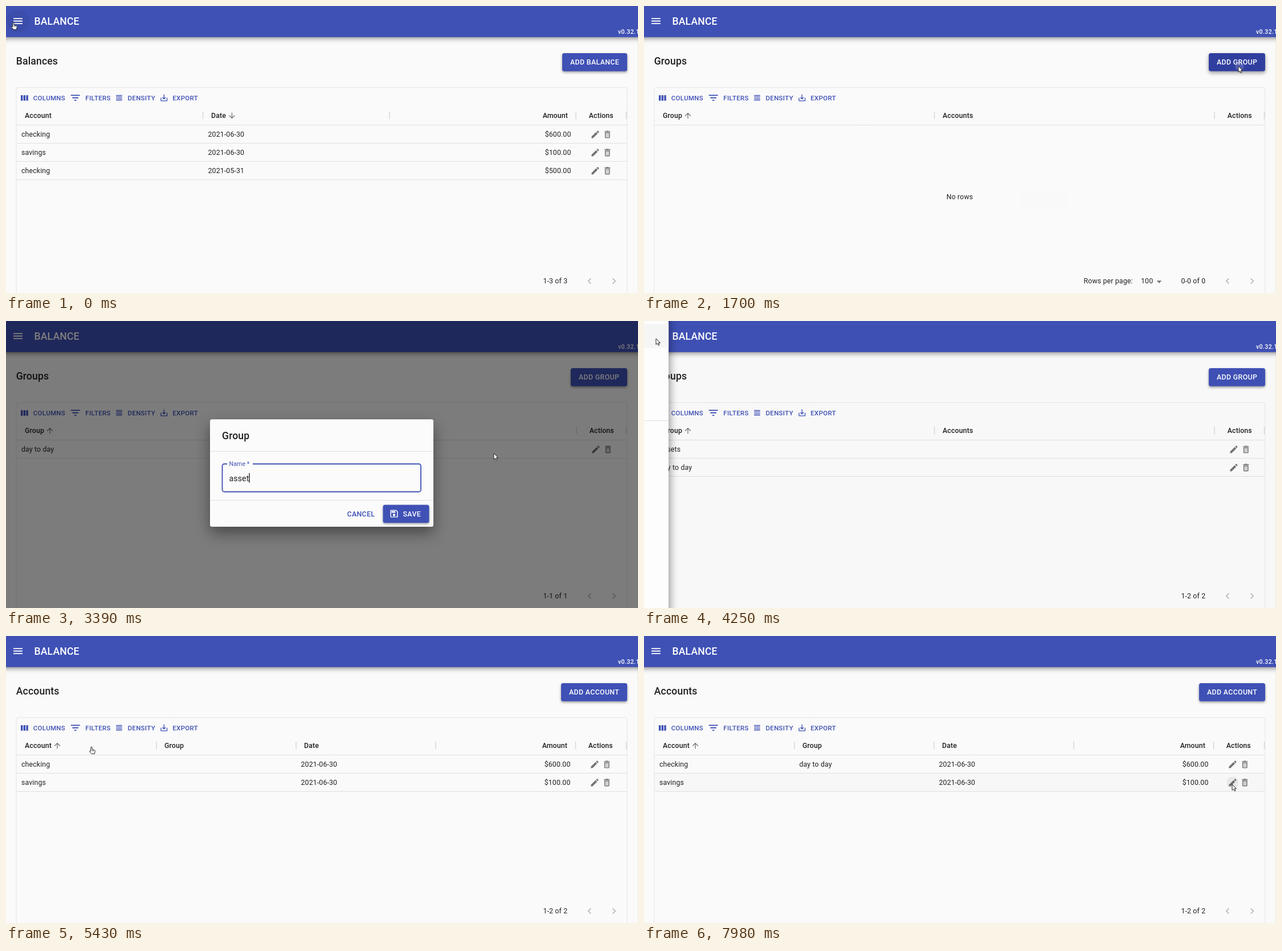
An HTML page with a canvas for the animation above (8000 ms loop, 1109 by 505 pixels).

```html
<!DOCTYPE html>
<html lang="en">
<head>
<meta charset="utf-8">
<title>Balance</title>
<style>
html, body { margin: 0; width: 100%; height: 100%; overflow: hidden; background: #fafafa; }
canvas { display: block; width: 1109px; height: 505px; }
</style>
</head>
<body>
<canvas id="stage"></canvas>
<script>
const W = 1109, H = 505, LOOP = 8000, STEP = 169.75;
const canvas = document.getElementById('stage');
const ctx = canvas.getContext('2d');
const dpr = window.devicePixelRatio || 1;
canvas.width = Math.round(W * dpr);
canvas.height = Math.round(H * dpr);

const BLUE = '#3f51b5', INK = 'rgba(0,0,0,.87)', SOFT = 'rgba(0,0,0,.54)';
const LINE = '#e0e0e0', BODY = 12.35, INPUT = 14.1, TITLE = 17.64;

// Icons on a 24 unit grid
const dot = (x, y, r) => `M${x - r} ${y}a${r} ${r} 0 1 0 ${2 * r} 0a${r} ${r} 0 1 0 ${-2 * r} 0z`;
const ICONS = {
  menu: 'M3 18h18v-2H3zm0-5h18v-2H3zm0-7v2h18V6z',
  filter: 'M10 18h4v-2h-4zM3 6v2h18V6zm3 7h12v-2H6z',
  density: 'M4 15h16v-2H4zm0 4h16v-2H4zm0-8h16V9H4zm0-6v2h16V5z',
  save: 'M17 3H5a2 2 0 0 0-2 2v14a2 2 0 0 0 2 2h14a2 2 0 0 0 2-2V7zm2 16H5V5h11.2L19 7.8zM6 6h9v4H6z' + dot(12, 15, 3),
  download: 'M19 12v7H5v-7H3v7a2 2 0 0 0 2 2h14a2 2 0 0 0 2-2v-7zm-6 .7l2.6-2.6L17 11.5l-5 5-5-5 1.4-1.4 2.6 2.6V3h2z',
  edit: 'M3 17.25V21h3.75L17.8 9.94 14.06 6.2zM20.7 7a1 1 0 0 0 0-1.4l-2.3-2.3a1 1 0 0 0-1.4 0l-1.9 1.8 3.75 3.75z',
  trash: 'M15.5 4l-1-1h-5l-1 1H5v2h14V4zM6 19a2 2 0 0 0 2 2h8a2 2 0 0 0 2-2V7H6zM8 9h8v10H8z',
  down: 'M20 12l-1.4-1.4-5.6 5.6V4h-2v12.2l-5.6-5.6L4 12l8 8z',
  up: 'M4 12l1.4 1.4L11 7.8V20h2V7.8l5.6 5.6L20 12l-8-8z',
  prev: 'M15.4 7.4L14 6l-6 6 6 6 1.4-1.4-4.6-4.6z',
  next: 'M10 6L8.6 7.4l4.6 4.6-4.6 4.6L10 18l6-6z',
  drop: 'M7 10l5 5 5-5z',
  wallet: 'M21 7.3V5a2 2 0 0 0-2-2H5a2 2 0 0 0-2 2v14a2 2 0 0 0 2 2h14a2 2 0 0 0 2-2v-2.3a2 2 0 0 0 1-1.7V9a2 2 0 0 0-1-1.7zM20 9v6h-7V9zM5 19V5h14v2h-6a2 2 0 0 0-2 2v6a2 2 0 0 0 2 2h6v2z' + dot(16, 12, 1.5),
  bank: 'M6.5 10h-2v7h2zm6 0h-2v7h2zm8.5 9H2v2h19zm-2.5-9h-2v7h2zm-7-6.7L16.7 6H6.3zm0-2.3L2 6v2h19V6z',
  group: dot(12, 12, 10) + dot(12, 12, 8) + dot(8, 14, 2) + dot(12, 8, 2) + dot(16, 14, 2),
  chart: 'M19 3H5a2 2 0 0 0-2 2v14a2 2 0 0 0 2 2h14a2 2 0 0 0 2-2V5a2 2 0 0 0-2-2zm0 16H5V5h14zM7 10h2v7H7zm4-3h2v10h-2zm4 6h2v4h-2z',
  door: 'M14 6v15H3v-2h2V3h9v1h5v15h2v2h-4V6zM7 5v14h5V5zm3 6v2h1v-2z'
};
for (const k in ICONS) ICONS[k] = new Path2D(ICONS[k]);
const ARROW = new Path2D('M0 0v10.4l2.5-2.2 1.7 3.7 1.8-.8-1.7-3.6h3.2z');
const HAND = new Path2D('M-1.1 1.1a1.1 1.1 0 0 1 2.2 0V4.8l4 1q1.5 .5 1.2 2l-.9 4.5H.3L-3.4 8.200q.2-1.500 1.500-1L-1.100 7.800z');

const PAGES = {
  balances: {
    title: 'Balances', add: 'ADD BALANCE', left: 976, seps: [345.5, 673, 1000], sort: ['down', 396.5],
    cols: [['Account', 33, 27], ['Date', 360, 354.5], ['Amount', 986, 991.5, 1]], act: 1023
  },
  groups: {
    title: 'Groups', add: 'ADD GROUP', left: 991, seps: [509.5, 1001], sort: ['up', 77],
    cols: [['Group', 33, 27], ['Accounts', 524, 518]], act: 1024
  },
  accounts: {
    title: 'Accounts', add: 'ADD ACCOUNT', left: 974, seps: [264, 509, 754, 999.5], sort: ['up', 90],
    cols: [['Account', 33, 27], ['Group', 278, 272.5], ['Date', 523, 517.5], ['Amount', 985, 990.5, 1]], act: 1022
  }
};
const MENU = [['Balances', 'wallet', 26.5], ['Accounts', 'bank', 69], ['Groups', 'group', 111.3],
  ['History', 'chart', 153.7], ['Sign Out', 'door', 197]];

// Cursor stops: time, x, y, pointing hand
const PATH = [
  [0, 13, 29, 1], [250, 13, 29, 1], [680, 78, 114, 1], [1020, 78, 114, 1], [1190, 110, 118, 0],
  [1560, 1043, 106, 0], [2080, 1043, 106, 0], [2370, 700, 339, 0], [2540, 700, 339, 0],
  [2860, 1043, 106, 0], [3220, 1043, 106, 0], [3550, 700, 339, 0], [3720, 700, 339, 0],
  [4070, 21, 31, 0], [4390, 21, 31, 0], [4580, 78, 72, 1], [4930, 78, 72, 1], [5090, 90, 90, 1],
  [5432, 150, 195, 1], [5770, 1032, 224, 0], [5940, 1032, 224, 0], [6111, 939, 230, 0],
  [6440, 600, 311, 0], [6600, 600, 311, 0], [6790, 430, 391, 1], [6980, 430, 391, 0],
  [7290, 700, 374, 0], [7460, 700, 374, 0], [7960, 1032, 261, 0], [8000, 1032, 261, 0]
];

const clamp = v => Math.max(0, Math.min(1, v));
const smooth = p => p * p * (3 - 2 * p);
const fade = (t, a, b) => smooth(clamp((t - a) / 225)) * (1 - smooth(clamp((t - b) / 195)));
const typed = (s, t, a, b) => s.slice(0, Math.round(s.length * clamp((t - a) / (b - a))));

function cursorAt(t) {
  let i = 0;
  while (i < PATH.length - 2 && PATH[i + 1][0] <= t) i++;
  const [a, b] = [PATH[i], PATH[i + 1]];
  const p = smooth(clamp((t - a[0]) / (b[0] - a[0])));
  return { x: a[1] + (b[1] - a[1]) * p, y: a[2] + (b[2] - a[2]) * p, hand: a[3] };
}

function text(s, x, y, size = BODY, color = INK, weight = 400, spacing = .13, align = 'left') {
  ctx.font = `${weight} ${size}px Roboto, sans-serif`;
  ctx.letterSpacing = spacing + 'px';
  ctx.textAlign = align;
  ctx.fillStyle = color;
  ctx.fillText(s, x, y + size * .355);
}

function icon(name, x, y, size, color) {
  ctx.save();
  ctx.translate(x - size / 2, y - size / 2);
  ctx.scale(size / 24, size / 24);
  ctx.fillStyle = color;
  ctx.fill(ICONS[name], 'evenodd');
  ctx.restore();
}

function rect(x, y, w, h, color) {
  ctx.fillStyle = color;
  ctx.fillRect(x, y, w, h);
}

function disc(x, y, r, color) {
  ctx.fillStyle = color;
  ctx.beginPath();
  ctx.arc(x, y, r, 0, 7);
  ctx.fill();
}

function round(x, y, w, h, r) {
  ctx.beginPath();
  ctx.roundRect(x, y, w, h, r);
}

function raised(x, y, w, h, r, color, blur, dy, alpha) {
  ctx.save();
  ctx.shadowColor = `rgba(0,0,0,${alpha})`;
  ctx.shadowBlur = blur * dpr;
  ctx.shadowOffsetY = dy * dpr;
  ctx.fillStyle = color;
  round(x, y, w, h, r);
  ctx.fill();
  ctx.restore();
}

function rowsFor(s, t) {
  if (s === 'balances') return [['checking', '2021-06-30', '$600.00'],
    ['savings', '2021-06-30', '$100.00'], ['checking', '2021-05-31', '$500.00']];
  if (s === 'accounts') return [['checking', t > 7400 ? 'day to day' : '', '2021-06-30', '$600.00'],
    ['savings', '', '2021-06-30', '$100.00']];
  const rows = [];
  if (t > 3720) rows.push(['assets', '']);
  if (t > 2540) rows.push(['day to day', '']);
  return rows;
}

function drawBar(t) {
  raised(-20, -20, W + 40, 74.7, 0, BLUE, 9, 2.5, .5);
  if (t < 400) disc(21, 27, 20, 'rgba(0,0,0,.06)');
  icon('menu', 21, 26.5, 21.2, '#fff');
  text('BALANCE', 49.5, 26.3, TITLE, '#fff', 500);
  text('v0.32.1', 1074, 45.7, 10.6, '#fff', 500, .35);
}

function drawAdd(page, t, cur, free) {
  const x = page.left, w = 1090 - x;
  const over = free && cur.x > x && cur.y > 83 && cur.y < 115 && cur.x < 1090;
  raised(x, 83, w, 31.7, 3.5, over ? '#303f9f' : BLUE, over ? 7 : 4, over ? 3 : 2, .4);
  for (const start of [1643, 2820]) {
    const age = t - start;
    if (age > 0 && age < 400) {
      ctx.save();
      round(x, 83, w, 31.7, 3.5);
      ctx.clip();
      disc(1045, 106, age * .14, `rgba(255,255,255,${.2 * (1 - age / 400)})`);
      ctx.restore();
    }
  }
  text(page.add, x + 14, 98.8, BODY, '#fff', 500, .35);
}

function drawToolbar() {
  for (let i = 0; i < 3; i++) rect(26 + i * 4.7, 157, 3.4, 9.6, BLUE);
  icon('filter', 121.7, 161.5, 21.2, BLUE);
  icon('density', 198.5, 161.5, 15.9, BLUE);
  icon('download', 277.3, 161.5, 15.9, BLUE);
  [['COLUMNS', 47.7], ['FILTERS', 139.3], ['DENSITY', 213.5], ['EXPORT', 292.3]]
    .forEach(([s, x]) => text(s, x, 161.8, 11.47, BLUE, 500, .33));
}

function drawPage(name, t, cur, free, editing) {
  const page = PAGES[name], rows = rowsFor(name, t);
  rect(0, 0, W, H, '#fafafa');
  rect(W - 1, 55, 1, H, '#eeeeee');
  drawBar(t);
  text(page.title, 17.7, 97, TITLE, INK, 500);
  drawAdd(page, t, cur, free);

  ctx.strokeStyle = '#e4e4e4';
  ctx.lineWidth = 1;
  round(18, 143.5, 1072, 400, 3.5);
  ctx.stroke();
  drawToolbar();
  for (const x of [...page.seps, 1088.5]) rect(x - .7, 186, 1.5, 13, '#d6d6d6');
  for (const [label, x, , right] of page.cols)
    text(label, x, 192.5, BODY, INK, 500, .13, right ? 'right' : 'left');
  text('Actions', page.act - .3, 192.5, BODY, INK, 500);
  icon(page.sort[0], page.sort[1], 193, 15.9, SOFT);
  rect(18.5, 209, 1071, 1, LINE);

  rows.forEach((row, i) => {
    const y = 225.5 + i * 31.9, ex = page.act + 11;
    if (free && cur.x > 18 && cur.x < 1090 && Math.abs(cur.y - y) < 16)
      rect(18.5, y - 15.5, 1071, 31, 'rgba(0,0,0,.012)');
    rect(18.5, Math.round(y + 15.5), 1071, 1, LINE);
    row.forEach((cell, c) => {
      const [, , x, right] = page.cols[c];
      text(cell, x, y, BODY, INK, 400, .13, right ? 'right' : 'left');
    });
    if (editing && i === 0) disc(ex, y + .5, 10.5, 'rgba(0,0,0,.13)');
    else if (free && Math.hypot(cur.x - ex, cur.y - y) < 10) disc(ex, y + .5, 10.5, 'rgba(0,0,0,.06)');
    icon('edit', ex, y + .5, 17.6, SOFT);
    rect(ex + 18.5, y - 1.5, 5.6, 7, 'rgba(0,0,0,.16)');
    icon('trash', ex + 21.3, y + .5, 17.6, SOFT);
  });

  const n = rows.length;
  if (!n) {
    text('No rows', 554, 335.5, BODY, INK, 400, .13, 'center');
    text('Rows per page:', 771.5, 484, BODY);
    text('100', 872, 484, BODY);
    icon('drop', 904, 485, 21.2, SOFT);
  }
  text(`${n ? 1 : 0}-${n} of ${n}`, 942.5, 484, BODY);
  icon('prev', 1024, 484, 21.2, 'rgba(0,0,0,.26)');
  icon('next', 1067, 484, 21.2, 'rgba(0,0,0,.26)');
}

function drawField(y, label, value, focus, caret) {
  const small = focus || value;
  ctx.strokeStyle = focus ? BLUE : '#c4c4c4';
  ctx.lineWidth = focus ? 1.8 : 1;
  round(379.5, y, 348.5, 49, 3.5);
  ctx.stroke();
  if (small) {
    rect(388, y - 2, label.length > 5 ? 45 : 38, 4, '#fbfbfb');
    text(label, 391.5, y, 10.6, focus ? BLUE : SOFT, 400, .1);
  } else text(label, 391.5, y + 24.5, INPUT, SOFT);
  text(value, 391.5, y + 25, INPUT);
  if (caret) rect(391.5 + ctx.measureText(value).width, y + 16, 1.2, 17, '#000');
}

function drawDialog(d, alpha, t) {
  const h = d.pick ? 259 : 189, top = 267.5 - h / 2, foot = top + h;
  ctx.globalAlpha = alpha;
  rect(0, 0, W, H, 'rgba(0,0,0,.5)');
  raised(358, top, 392, h, 3.5, '#fbfbfb', 26, 11, .42);
  text(d.title, 379, top + 28.5, TITLE, INK, 500);
  rect(358, Math.round(top + 56), 392, 1, LINE);
  rect(358, Math.round(foot - 47), 392, 1, LINE);
  const picking = d.pick && t > 6440;
  drawField(top + 78.5, 'Name *', d.value, !picking, !picking);
  if (d.pick) {
    drawField(top + 149.5, 'Group', t > 6960 ? 'day to day' : '', picking, picking && t < 6960);
    icon('drop', 712, top + 173.5, 21.2, SOFT);
  }
  text('CANCEL', 598.5, foot - 22.8, BODY, BLUE, 500, .35);
  raised(661.5, foot - 38.5, 81, 31.7, 3.5, BLUE, 4, 2, .35);
  icon('save', 681, foot - 23, 17.6, '#fff');
  text('SAVE', 696.5, foot - 22.8, BODY, '#fff', 500, .35);
  if (picking && t > 6500 && t < 6960) {
    raised(379, 336, 349, 78, 3.5, '#fff', 6, 2, .3);
    if (t > 6720) rect(379, 375, 349, 32, 'rgba(0,0,0,.06)');
    text('assets', 393, 359, INPUT);
    text('day to day', 393, 391, INPUT);
  }
  ctx.globalAlpha = 1;
}

function drawDrawer(shown, shade, t, cur, click, target) {
  rect(0, 0, W, H, `rgba(0,0,0,${.5 * shade})`);
  ctx.save();
  ctx.translate(-220.5 * (1 - shown), 0);
  raised(-60, -60, 280.5, H + 120, 0, '#fdfdfd', 16, 4, .55);
  MENU.forEach(([label, name, y], i) => {
    if (Math.abs(cur.y - y) < 21) rect(0, y - 21.2, 220.5, 42.3, '#f5f5f5');
    if (i === target && t > click) {
      ctx.save();
      ctx.beginPath();
      ctx.rect(0, y - 21.2, 220.5, 42.3);
      ctx.clip();
      disc(89.5, y + 2, 88 * clamp((t - click) / 85), 'rgba(0,0,0,.2)');
      ctx.restore();
    }
    if (i === 3) rect(18, y - 6, 13, 12, 'rgba(0,0,0,.1)');
    icon(name, 24.7, y, 21.2, SOFT);
    text(label, 63.3, y + .2, INPUT);
  });
  rect(0, 175, 220.5, 1, LINE);
  ctx.restore();
}

function drawCursor(c) {
  ctx.save();
  ctx.translate(c.x, c.y);
  ctx.lineJoin = 'round';
  ctx.lineWidth = 1;
  ctx.fillStyle = '#fff';
  ctx.strokeStyle = '#222';
  const shape = c.hand ? HAND : ARROW;
  ctx.fill(shape);
  ctx.stroke(shape);
  if (c.hand) {
    ctx.lineWidth = .6;
    for (const x of [1.6, 3.4]) {
      ctx.beginPath();
      ctx.moveTo(x, 5.5);
      ctx.lineTo(x, 8);
      ctx.stroke();
    }
  }
  ctx.restore();
}

function draw(t) {
  ctx.setTransform(dpr, 0, 0, dpr, 0, 0);
  const cur = cursorAt(t);
  const name = t < 1000 ? 'balances' : t < 4920 ? 'groups' : 'accounts';
  const dialogs = [
    { from: 1690, to: 2500, title: 'Group', value: typed('day to day', t, 1850, 2330) },
    { from: 2867, to: 3680, title: 'Group', value: typed('assets', t, 3080, 3500) },
    { from: 5830, to: 7370, title: 'Account', value: 'checking', pick: true }
  ];
  const drawers = [[100, 978, 930, 2], [4228, 4890, 4820, 1]];
  const dialog = dialogs.find(d => t > d.from && t < d.to + 195);
  const drawer = drawers.find(d => t > d[0] && t < d[1] + 195);
  const alpha = dialog ? fade(t, dialog.from, dialog.to) : 0;

  drawPage(name, t, cur, alpha < .1 && !drawer, dialog && dialog.pick);
  if (dialog) drawDialog(dialog, alpha, t);
  if (drawer) {
    const [from, to, click, target] = drawer;
    const out = 1 - smooth(clamp((t - to) / 195));
    const shown = (1 - (1 - clamp((t - from) / 225)) ** 3) * out;
    drawDrawer(shown, fade(t, from, to), t, cur, click, target);
  }
  drawCursor(cur);
}

function tick(now) {
  const t = now % LOOP;
  draw(Math.floor((t + 20) / STEP) * STEP);
  requestAnimationFrame(tick);
}
requestAnimationFrame(tick);
</script>
</body>
</html>
```
